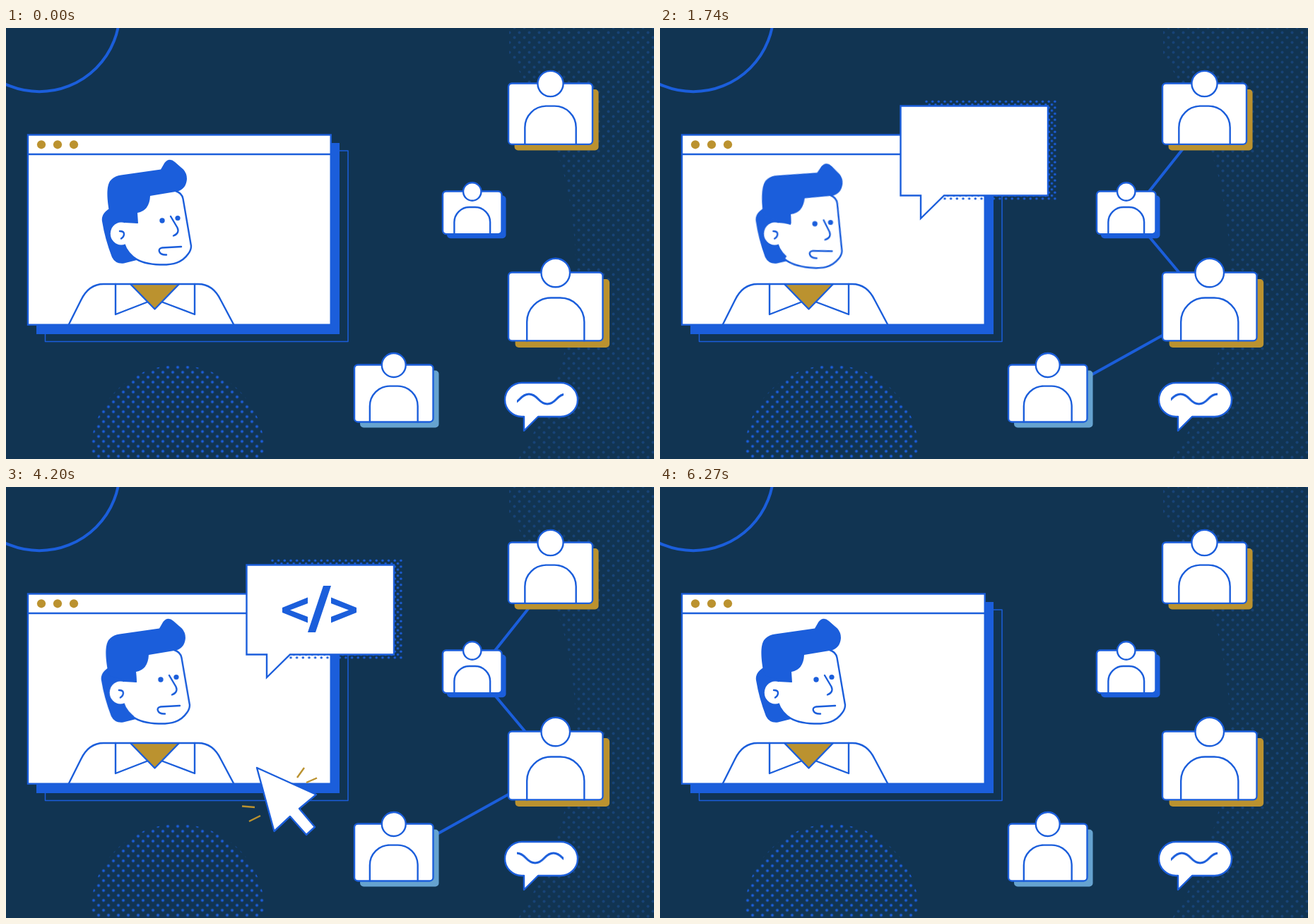
An HTML page for the animation above (6300 ms loop, 917 px wide and 611 px high).

```html
<!DOCTYPE html>
<html lang="en">
<head>
<meta charset="utf-8">
<title>Online team chat</title>
<style>
  html, body { margin: 0; width: 100%; height: 100%; overflow: hidden; background: #113452; }
  svg { display: block; width: 917px; height: 611px; }
  .blue { fill: #1b5edb; }
  .gold { fill: #bb922f; }
  .sky { fill: #66a3d0; }
  .line { fill: none; stroke: #1b5edb; stroke-width: 2.4; stroke-linecap: round; stroke-linejoin: round; }
  .box { fill: #fff; stroke: #1b5edb; stroke-width: 2.4; }

  .link, .bubble, .glyph, .head, .back, .cursor-x, .cursor-y, .spark {
    animation: 6.3s linear infinite;
  }

  .link { fill: none; stroke: #1b5edb; stroke-width: 4; stroke-dasharray: 100 300; animation-name: link; }
  @keyframes link {
    0%, 4.29% { stroke-dashoffset: 100; animation-timing-function: ease-in-out; }
    23.33%, 81.9% { stroke-dashoffset: 0; animation-timing-function: ease-in-out; }
    97.78%, 100% { stroke-dashoffset: 100; }
  }

  .bubble { transform-origin: 369px 270px; animation-name: bubble; }
  @keyframes bubble {
    0%, 18.1% { transform: rotate(24deg) scale(0); }
    20.95% { transform: rotate(-4deg) scale(1); animation-timing-function: ease-out; }
    22.22% { transform: rotate(-10.5deg) scale(1); animation-timing-function: ease-in-out; }
    24.76%, 90.48% { transform: rotate(0deg) scale(1); animation-timing-function: ease-in-out; }
    93.02% { transform: rotate(-10.5deg) scale(1); animation-timing-function: ease-in; }
    94.29% { transform: rotate(-4deg) scale(1); }
    97.14%, 100% { transform: rotate(24deg) scale(0); }
  }

  .glyph { animation-timing-function: step-end; }
  .open { animation-name: open; }
  .slash { animation-name: slash; }
  .close { animation-name: close; }
  @keyframes open { 0% { opacity: 0; } 28.57% { opacity: 1; } 87.94%, 100% { opacity: 0; } }
  @keyframes slash { 0% { opacity: 0; } 30.48% { opacity: 1; } 86.35%, 100% { opacity: 0; } }
  @keyframes close { 0% { opacity: 0; } 32.38% { opacity: 1; } 84.76%, 100% { opacity: 0; } }

  .head, .back { transform-origin: 157px 250px; }
  .head { animation-name: head; }
  .back { animation-name: back; }
  @keyframes head {
    0%, 100% { transform: translateX(0) rotate(0deg); }
    30.16% { transform: translateX(0) rotate(4.5deg); animation-timing-function: ease-in-out; }
    42.86% { transform: translateX(-3.6px) rotate(0deg); }
  }
  @keyframes back {
    0%, 100% { transform: translateX(0) rotate(0deg); }
    30.16% { transform: translateX(0) rotate(1deg); animation-timing-function: ease-in-out; }
    42.86% { transform: translateX(-2px) rotate(0deg); }
  }

  .cursor-x { animation-name: cursor-x; }
  .cursor-y { animation-name: cursor-y; }
  @keyframes cursor-x {
    0%, 45.71% { transform: translateX(122px); animation-timing-function: cubic-bezier(.45, 0, .6, 1); }
    59.05%, 91.11% { transform: translateX(355px); animation-timing-function: cubic-bezier(.4, 0, .55, 1); }
    99.05%, 100% { transform: translateX(122px); }
  }
  @keyframes cursor-y {
    0%, 45.71% { transform: translateY(625px); animation-timing-function: cubic-bezier(.33, 0, .53, 1); }
    59.05%, 91.11% { transform: translateY(398px); animation-timing-function: cubic-bezier(.47, 0, .67, 1); }
    99.05%, 100% { transform: translateY(625px); }
  }

  .spark { fill: none; stroke: #bb922f; stroke-width: 2.4; stroke-dasharray: 1 3; animation-name: spark; }
  @keyframes spark {
    0%, 63.8% { stroke-dashoffset: 1; animation-timing-function: ease-out; }
    65.7%, 67.6% { stroke-dashoffset: 0; animation-timing-function: ease-in; }
    69.8%, 100% { stroke-dashoffset: -1; }
  }

  .wave { stroke-width: 3; animation: wave .9s linear infinite; }
  @keyframes wave { to { transform: translateX(52px); } }
</style>
</head>
<body>
<svg viewBox="0 0 917 611">
  <defs>
    <pattern id="dots" x="239.5" y="477.5" width="14" height="14" patternUnits="userSpaceOnUse">
      <circle class="blue" cx="3.5" cy="3.5" r="2"/>
      <circle class="blue" cx="10.5" cy="10.5" r="2"/>
    </pattern>
    <pattern id="faint" x="709" y="3" width="14" height="14" patternUnits="userSpaceOnUse">
      <circle cx="3.5" cy="3.5" r="2" fill="#174377"/>
      <circle cx="10.5" cy="10.5" r="2" fill="#174377"/>
    </pattern>
    <pattern id="fine" x="374.8" y="102.1" width="8.66" height="8.6" patternUnits="userSpaceOnUse">
      <circle class="blue" cx="2.2" cy="2.2" r="1.7"/>
      <circle class="blue" cx="6.5" cy="6.5" r="1.7"/>
    </pattern>
    <clipPath id="wave-clip"><rect x="723" y="510" width="65.5" height="32"/></clipPath>
  </defs>

  <rect width="917" height="611" fill="#113452"/>
  <path d="M712 0H917V611H725A512 512 0 0 0 712 40Z" fill="url(#faint)"/>
  <circle cx="47.2" cy="-23.5" r="113.7" class="line" style="stroke-width:4"/>
  <circle cx="243" cy="601" r="123" fill="url(#dots)"/>

  <path class="link" pathLength="100" d="M780 121L666 264.500L778 398.500L549 526"/>
  <g id="cards"></g>

  <path class="box" stroke-linejoin="round" d="M730 503H785A24 24 0 0 1 785 551H753L733 571V551H730A24 24 0 0 1 730 503Z"/>
  <g clip-path="url(#wave-clip)">
    <path class="line wave" d="M623 526q13 -14 26 0t26 0t26 0t26 0t26 0t26 0t26 0"/>
  </g>

  <!-- browser window -->
  <rect x="55.5" y="174" width="428.5" height="270.5" class="line" style="stroke-width:1.5"/>
  <rect x="43" y="163" width="429" height="271" class="blue"/>
  <rect x="31" y="151.5" width="428.7" height="269.2" class="box"/>
  <path class="line" d="M31 179H460"/>
  <g class="gold">
    <circle cx="50" cy="165.3" r="6.1"/><circle cx="73" cy="165.3" r="6.1"/><circle cx="96" cy="165.3" r="6.1"/>
  </g>

  <!-- speaker -->
  <path class="gold" d="M176 363H245L210.5 398.5Z"/>
  <path class="line" d="M89 420L106 386Q117 363 138 363H272Q293 363 304 386L322 420"/>
  <path class="line" d="M155 363V406L200 388.5M267 363V406L221 388.5M176 363L210.5 398.5L245 363"/>
  <g class="back">
    <path class="blue" d="M150 254Q134 262 136 274Q140 299 150 325Q155 335 167 333.500L187 328.500Q172 318 168.500 306L168 276L186 277L185 262Z"/>
    <ellipse cx="163" cy="291.500" rx="15.200" ry="16" fill="#fff"/>
    <path class="line" d="M161 288Q167 288 167 292Q167 296 163 298.500"/>
  </g>
  <g class="head">
    <path class="line" style="fill:#fff" d="M240 231Q249 234 250.5 242L262 309Q262 315 258 320C249 333 236 336 218 335.5C202 335 190 332 182 326"/>
    <path class="blue" d="M146 260C143 243 143 233 144 226Q146 211 163 208.500L219 200.500L224.500 191Q231 183 239 190L251 200.500Q256 206 256 214Q255 228 243 231.500L204 238Q203 259 186 262L187 277L173 274L150 268Z"/>
    <circle class="blue" cx="221" cy="273" r="3.7"/>
    <circle class="blue" cx="243" cy="269.500" r="3.6"/>
    <path class="line" d="M233 267L242.500 283Q246 291 237 294.500M248 310L221 311.500Q215.500 312.500 217 317Q219 322 227 321.500"/>
  </g>

  <!-- speech bubble -->
  <g class="bubble">
    <rect x="374.8" y="102.1" width="186.2" height="142" fill="url(#fine)"/>
    <path class="box" d="M340.500 110.500H549V237.500H402L369 270V237.500H340.500Z"/>
    <g class="blue">
      <path class="glyph open" d="M427 156.500L391 171V178L427 192.500V184L402 174.500L427 165Z"/>
      <path class="glyph slash" d="M449 140H460L438 206H427Z"/>
      <path class="glyph close" d="M460 156.500L496 171V178L460 192.500V184L485 174.500L460 165Z"/>
    </g>
  </g>

  <path class="spark" pathLength="1" d="M412 412L422 398"/>
  <path class="spark" pathLength="1" d="M425 419L440 412.500"/>
  <path class="spark" pathLength="1" d="M352 454L334 452.500"/>
  <path class="spark" pathLength="1" d="M360 466L344 474"/>
  <g class="cursor-x"><g class="cursor-y">
    <path class="box" stroke-linejoin="round" d="M0 0L84 38L60 58L82 84L70 95L47 69L24.500 90Z"/>
  </g></g>
</svg>
<script>
  // Card proportions all follow from the card width.
  const card = (x, y, w, tone) => {
    const h = w * .726, mid = x + w / 2, off = w * .072;
    const half = w * .304, top = y + w * .27, r = half * .84;
    return `<rect x="${x + off}" y="${y + off}" width="${w}" height="${h}" rx="5" class="${tone}"/>
      <rect x="${x}" y="${y}" width="${w}" height="${h}" rx="5" class="box"/>
      <path class="line" d="M${mid - half} ${y + h}V${top + r}a${r} ${r} 0 0 1 ${r} ${-r}
        H${mid + half - r}a${r} ${r} 0 0 1 ${r} ${r}V${y + h}"/>
      <circle cx="${mid}" cy="${y + .5}" r="${w * .152}" class="box"/>`;
  };
  document.getElementById('cards').innerHTML =
    card(711, 78.5, 119, 'gold') + card(618, 231.5, 83.5, 'blue') +
    card(711, 346.5, 133.5, 'gold') + card(493, 477.5, 111.5, 'sky');
</script>
</body>
</html>
```
